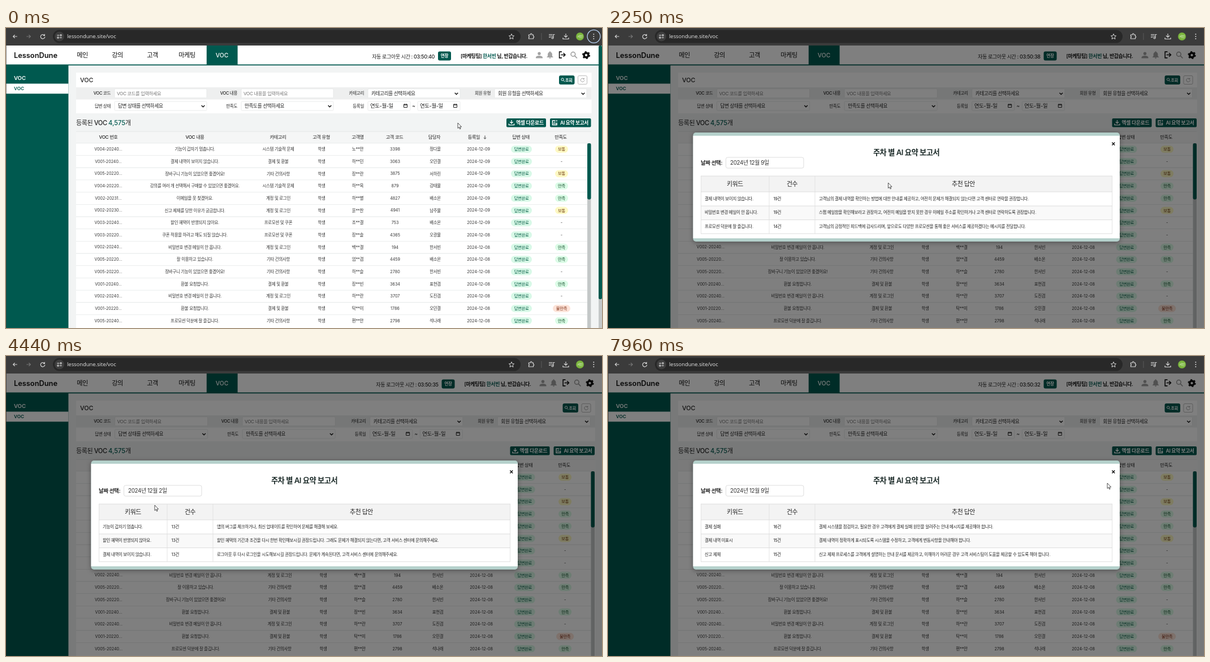
Animation of 1054 by 531 pixels, one loop 8000 ms. Source, as an HTML page with a canvas:

```html
<!DOCTYPE html>
<html lang="ko">
<head>
<meta charset="utf-8">
<title>VOC</title>
<style>
html, body { margin: 0; width: 100%; height: 100%; overflow: hidden; background: #f2f4f4; }
canvas { display: block; width: 1054px; height: 531px; }
</style>
</head>
<body>
<canvas id="stage" width="1054" height="531"></canvas>
<script>
const c = document.getElementById('stage').getContext('2d');
const LOOP = 8000, W = 1054, H = 531;
const GREEN = '#00594f', INK = '#222';
const FONT = 'Inter, "Noto Sans CJK KR", "Noto Sans CJK", sans-serif';

// ---- helpers ----
function box(x, y, w, h, fill, r = 0, stroke) {
  c.beginPath();
  c.roundRect(x, y, w, h, r);
  if (fill) { c.fillStyle = fill; c.fill(); }
  if (stroke) { c.strokeStyle = stroke; c.lineWidth = .8; c.stroke(); }
}

function setFont(s, size, weight, family = FONT) {
  c.font = `${weight} ${size}px ${family}`;
  c.letterSpacing = /[가-힣]/.test(s) ? -.04 * size + 'px' : '0px';
}

function text(s, x, y, size, { color = INK, weight = 400, align = 'left', family } = {}) {
  setFont(s, size, weight, family);
  c.fillStyle = color;
  c.textAlign = align;
  c.textBaseline = 'alphabetic';
  c.fillText(s, x, y + size * .36);
}

function runs(parts, x, y, size, weight) {
  for (const [s, color] of parts) {
    text(s, x, y, size, { color, weight });
    x += c.measureText(s).width;
  }
}

// Paths live on a 24-unit grid centred on (x, y).
function icon(d, x, y, size, color, { line = 0 } = {}) {
  const k = size / 24;
  c.save();
  c.translate(x - size / 2, y - size / 2);
  c.scale(k, k);
  const p = new Path2D(d);
  if (line) {
    c.strokeStyle = color;
    c.lineWidth = line / k;
    c.stroke(p);
  } else {
    c.fillStyle = color;
    c.fill(p);
  }
  c.restore();
}

const ICON = {
  back: 'M21 12H4M11 5L4 12L11 19',
  forward: 'M3 12H20M13 5L20 12L13 19',
  reload: 'M19 7A9 9 0 1 0 21 13M20 2V8H14',
  tune: 'M2 7H11M15 7a3 3 0 1 0 6 0a3 3 0 1 0 -6 0M22 17H13M3 17a3 3 0 1 0 6 0a3 3 0 1 0 -6 0',
  star: 'M12 2L15 9L22 9.5L16.5 14.5L18.5 22L12 18L5.500 22L7.500 14.500L2 9.500L9 9Z',
  puzzle: 'M3 7H9V5a2.500 2.500 0 0 1 5 0V7H19V12a2.500 2.500 0 0 1 0 5V21H3V16a2 2 0 0 0 0 -4Z',
  queue: 'M2 5H15M2 10H15M2 15H9M18 17V5H23M12 17a3 3 0 1 0 6 0a3 3 0 1 0 -6 0',
  download: 'M12 2V15M6 9L12 15L18 9M2 16V21H22V16',
  person: 'M12 12a5 5 0 1 0 0 -10a5 5 0 0 0 0 10ZM1 22V19Q3 14 12 14Q21 14 23 19V22Z',
  bell: 'M12 1Q14 1 14 3Q19 5 19 11V16L22 19V20H2V19L5 16V11Q5 5 10 3Q10 1 12 1ZM9 21H15Q14 24 12 24Q10 24 9 21Z',
  logout: 'M11 2H3V22H11M8 12H22M16 6L22 12L16 18',
  search: 'M2 9a7 7 0 1 0 14 0a7 7 0 1 0 -14 0M14.500 14.500L22 22',
  chevron: 'M3 8L12 17L21 8',
  date: 'M3 5H21V21H3ZM3 8H21M7 2V5M17 2V5',
  down: 'M12 2V21M5 14L12 21L19 14',
  chart: 'M2 3H14V6H5V19H18V12H21V22H2ZM7 11H9V17H7ZM11 8H13V17H11ZM15 13H17V17H15ZM19 1L20 4L23 5L20 6L19 9L18 6L15 5L18 4Z',
  cross: 'M3 3L21 21M21 3L3 21'
};

// ---- content ----
const CATEGORY = ['', '결제 및 환불', '계정 및 로그인', '프로모션 및 쿠폰', '시스템 기술적 문제', '기타 건의사항'];
const CART = '장바구니 기능이 있었으면 좋겠어요!', MAIL = '비밀번호 변경 메일이 안 옵니다.';
const REFUND = '환불 요청합니다.', UNSEEN = '결제 내역이 보이지 않습니다.';
const ROWS = `4-20240|기능이 갑자기 멈춥니다.|노**안|3398|정다올|보통
1-20240|${UNSEEN}|하**민|3063|오민결|-
5-20220|${CART}|장**란|3875|서하린|보통
4-20220|강의를 여러 개 선택해서 구매할 수 있었으면 좋겠어요.|하**옥|879|강태율|만족
2-20231|이메일을 못 찾겠어요.|하**별|4827|배소온|만족
2-20230|신고 제재를 당한 이유가 궁금합니다.|윤**찬|4941|남주율|보통
3-20240|할인 혜택이 반영되지 않아요.|조**결|753|배소온|-
3-20220|쿠폰 적용을 하려고 해도 되질 않습니다.|장**솔|4365|오광율|-
2-20240|${MAIL}|백**결|194|한서빈|만족
5-20220|잘 이용하고 있습니다.|엄**겸|4459|배소온|만족
5-20220|${CART}|하**슬|2780|한서빈|-
1-20240|${REFUND}|장**빈|3634|표현겸|만족
2-20240|${MAIL}|하**란|3707|도진겸|-
1-20220|${REFUND}|탁**미|1786|오민결|불만족
5-20240|프로모션 덕분에 잘 즐깁니다.|편**안|2798|석나래|만족`.split('\n').map(r => r.split('|'));

const REPORTS = [
  [[UNSEEN, 19, '고객님의 결제 내역을 확인하는 방법에 대한 안내를 제공하고, 여전히 문제가 해결되지 않는다면 고객 센터로 연락을 권장합니다.'],
   [MAIL, 19, '스팸 메일함을 확인해보라고 권장하고, 여전히 메일을 받지 못한 경우 이메일 주소를 확인하거나 고객 센터로 연락하도록 권장합니다.'],
   ['프로모션 덕분에 잘 즐깁니다.', 14, '고객님의 긍정적인 피드백에 감사드리며, 앞으로도 다양한 프로모션을 통해 좋은 서비스를 제공하겠다는 메시지를 전달합니다.']],
  [['기능이 갑자기 멈춥니다.', 13, '앱의 버그를 체크하거나, 최신 업데이트를 확인하여 문제를 해결해 보세요.'],
   ['할인 혜택이 반영되지 않아요.', 13, '할인 혜택의 기간과 조건을 다시 한번 확인해보시길 권장드립니다. 그래도 문제가 해결되지 않는다면, 고객 서비스 센터에 문의해주세요.'],
   [UNSEEN, 13, '로그아웃 후 다시 로그인을 시도해보시길 권장드립니다. 문제가 계속된다면, 고객 서비스 센터에 문의해주세요.']],
  [['결제 실패', 16, '결제 시스템을 점검하고, 필요한 경우 고객에게 결제 실패 원인을 알려주는 안내 메시지를 제공해야 합니다.'],
   ['결제 내역 미표시', 15, '결제 내역이 정확하게 표시되도록 시스템을 수정하고, 고객에게 변동사항을 안내해야 합니다.'],
   ['신고 제재', 15, '신고 제재 프로세스를 고객에게 설명하는 안내 문서를 제공하고, 이해하기 어려운 경우 고객 서비스팀이 도움을 제공할 수 있도록 해야 합니다.']]
];

// ---- browser bar ----
function drawBar(focusRing) {
  const pale = '#d6d6d6';
  box(0, 0, W, 31, '#3b3b3b');
  box(83, 3.5, 827, 23, '#282828', 11.5);
  icon(ICON.back, 16, 15, 10, pale, { line: 1.2 });
  icon(ICON.forward, 40, 15, 10, '#777', { line: 1.2 });
  icon(ICON.reload, 65, 15, 10, pale, { line: 1.2 });
  box(86, 6.500, 17, 17, '#3e3e3e', 8.5);
  icon(ICON.tune, 94.5, 15, 10, pale, { line: 1.1 });
  text('lessondune.site/voc', 108, 15, 9.4, { color: '#e6e6e6', family: '"Open Sans", sans-serif' });
  icon(ICON.star, 894, 15, 11, pale, { line: 1 });
  icon(ICON.puzzle, 929, 14.5, 12, pale, { line: 1.2 });
  box(946.5, 9, 1, 12, '#5a5a5a');
  icon(ICON.queue, 965, 15, 12, pale, { line: 1.2 });
  icon(ICON.download, 990, 15, 12, pale, { line: 1.2 });
  box(1008, 8, 14, 14, '#7ab53c', 7);
  text('서빈', 1015, 15, 5.5, { color: '#eef5e8', align: 'center' });
  if (focusRing) {
    box(1028, 3.3, 23, 23, '#3b3b3b', 11.5);
    c.strokeStyle = '#b9d3f5';
    c.lineWidth = 1.3;
    c.stroke();
  }
  for (const y of [11, 15, 19]) box(1038.3, y - 1, 2, 2, pale, 1);
}

// ---- page; wide = page scrollbar hidden ----
function drawPage(wide, clock) {
  const edge = wide ? 6.5 : 0;
  const X = x => x + (x - 124) * edge / 911;

  box(0, 31, W, 500, '#f2f4f4');
  box(0, 31, W, 34, '#fff');
  box(0, 64.5, W, 1.7, GREEN);
  box(0, 66, 110.4, 465, GREEN);
  box(354.8, 31, 54.8, 34, GREEN);
  text('LessonDune', 14, 48, 12.8, { weight: 600, color: '#111' });
  [['메인', 135], ['강의', 197], ['고객', 259], ['마케팅', 320], ['VOC', 382]].forEach(([s, x], i) =>
    text(s, x, 48, i < 4 ? 11.2 : 10.3, { weight: 500, align: 'center', color: i < 4 ? '#111' : '#fff' }));
  text('VOC', 14, 89, 9.6, { weight: 600, color: '#fff' });
  box(0, 98.5, 110.4, 17.7, '#fff');
  text('VOC', 14, 107.3, 8.2, { weight: 600, color: GREEN });
  box(0, 31, .6, 500, '#3b3b3b');

  c.save();
  c.translate(edge, 0);
  text('자동 로그아웃 시간 : ' + clock, 758, 50.5, 9, { weight: 500, align: 'right' });
  box(764, 41.5, 23, 16, GREEN, 3);
  text('연장', 775.5, 49.5, 7.6, { weight: 600, align: 'center', color: '#fff' });
  runs([['[마케팅팀] ', '#111'], ['한서빈', GREEN], [' 님, 반갑습니다.', '#111']], 804, 49.5, 8.9, 600);
  icon(ICON.person, 943, 48, 13, '#a3a3a3');
  icon(ICON.bell, 962, 47.5, 13.5, '#a3a3a3');
  icon(ICON.logout, 983.5, 47.5, 13, '#111', { line: 1.6 });
  icon(ICON.search, 1004.5, 48, 13, '#999', { line: 1.5 });
  drawGear(1026, 48);
  c.restore();

  drawFilters(X, edge);
  drawTable(X, edge);

  if (!wide) {
    box(1048, 31, 6, 500, '#c4c8c8');
    box(1048, 31, 6, 449, GREEN, 2.5);
  }
}

function drawGear(x, y) {
  c.strokeStyle = '#111';
  c.beginPath();
  c.arc(x, y, 3.9, 0, 7);
  c.lineWidth = 3.6;
  c.stroke();
  c.setLineDash([2.8, Math.PI * 12 / 6 - 2.8]);
  c.beginPath();
  c.arc(x, y, 6, 0, Math.PI * 2);
  c.lineWidth = 2.2;
  c.stroke();
  c.setLineDash([]);
}

function drawFilters(X, edge) {
  box(124, 79, 911.5 + edge, 72, '#fff');
  text('VOC', 131, 92, 10.8, { weight: 500 });
  box(978 + edge, 84, 27.5, 16, GREEN, 3);
  icon(ICON.search, 985 + edge, 92, 7.5, '#fff', { line: 1 });
  text('조회', 989 + edge, 92, 7, { weight: 600, color: '#fff' });
  box(1011.5 + edge, 84.5, 16, 15, '#fff', 2, '#aaa');
  icon(ICON.reload, 1019.5 + edge, 92, 8.5, '#999', { line: .9 });
  box(124, 105, 911.5 + edge, 21.5, '#eeefef');

  const labels = ['VOC 코드', 'VOC 내용', '카테고리', '회원 유형', '답변 상태', '만족도', '등록일'];
  const hints = ['VOC 코드를 입력하세요', 'VOC 내용을 입력하세요', '카테고리를 선택하세요',
    '회원 유형을 선택하세요', '답변 상태를 선택하세요', '만족도를 선택하세요'];
  labels.forEach((label, i) => {
    const x = 192 + i % 4 * 224, y = i < 4 ? 115.7 : 138;
    text(label, X(x - 7), y, 7.5, { align: 'right', weight: 500 });
    if (i === 6) return;
    const select = i > 1;
    box(X(x), y - 8, X(x + 163) - X(x), 16, '#fff', 1.5, '#e4e6e6');
    text(hints[i], X(x + (select ? 6 : 4)), y, select ? 8.6 : 8.2,
      { color: select ? INK : '#777', weight: select ? 500 : 400 });
    if (select) icon(ICON.chevron, X(x + 156.5), y + .3, 7.5, '#111', { line: 1.4 });
  });
  for (const x of [640, 728]) {
    box(X(x), 130, 75, 16, '#fff', 1.5, '#e4e6e6');
    text('연도-월-일', X(x + 4), 138, 9.4);
    icon(ICON.date, X(x + 66.5), 137.5, 8, INK, { line: 1 });
  }
  text('~', X(721), 138, 8.5, { align: 'center' });
}

function drawTable(X, edge) {
  runs([['등록된 VOC ', INK], ['4,575', GREEN], ['개', INK]], 124, 168.5, 11.1, 500);
  box(885 + edge, 160, 70, 15.5, GREEN, 2);
  icon(ICON.download, 894 + edge, 167.5, 11, '#fff', { line: 1.4 });
  text('엑셀 다운로드', 902 + edge, 167.7, 8.9, { weight: 600, color: '#fff' });
  box(962 + edge, 160, 72.5, 15.5, GREEN, 2);
  icon(ICON.chart, 970.5 + edge, 167.5, 11.5, '#fff');
  text('AI 요약 보고서', 980 + edge, 167.7, 8.7, { weight: 600, color: '#fff' });

  box(124, 183, 911 + edge, 348, '#fff');
  box(124, 183, 911 + edge, 21, '#f5f6f6');
  box(124, 182.7, 911 + edge, .8, '#dfe2e2');
  const cols = [181, 334, 481, 557.5, 622, 687, 757.5, 827.5, 910.5, 981];
  ['VOC 번호', 'VOC 내용', '카테고리', '고객 유형', '고객명', '고객 코드', '담당자', '등록일', '답변 상태', '만족도']
    .forEach((s, i) => text(s, X(cols[i]), 193.5, 8.2, { align: 'center', weight: 500 }));
  icon(ICON.down, X(847), 193.5, 7.5, '#333', { line: .9 });

  const pill = (s, x, y, w, bg, ink) => {
    box(X(x) - w / 2, y - 6.3, w, 12.6, bg, 6.3);
    text(s, X(x), y, 7.3, { color: ink, align: 'center', weight: 500 });
  };
  const mood = {
    '보통': [23, '#fef9c3', '#713f12'],
    '만족': [23, '#dcfce7', '#14532d'],
    '불만족': [31, '#fde3d8', '#7c2d12']
  };
  ROWS.forEach(([id, body, name, code, staff, rating], i) => {
    const y = 214.5 + i * 21.68;
    const cell = (s, x, size = 7.45) => text(s, X(x), y, size, { align: 'center', color: '#333' });
    box(124, y - 11, 904 + edge, .8, '#e4e7e7');
    cell(`V00${id}...`, 181, 7.1);
    cell(body, 334);
    cell(CATEGORY[id[0]], 481.5);
    cell('학생', 558);
    cell(name, 622, 7.6);
    cell(code, 688, 7.2);
    cell(staff, 759);
    cell(i < 7 ? '2024-12-09' : '2024-12-08', 835.5, 7.2);
    pill('답변완료', 911.5, y, 37, '#d9f9e8', '#065f46');
    if (mood[rating]) pill(rating, 982.5, y, ...mood[rating]);
    else cell('-', 982.5);
  });
  box(1028 + edge, 204, 6.500, 327, '#c4c8c8');
  box(1028 + edge, 204, 6.500, 99.5, GREEN, 3);
}

// ---- dialog ----
function withShadow(blur, alpha, draw) {
  c.save();
  c.shadowColor = `rgba(0,0,0,${alpha})`;
  c.shadowBlur = blur;
  c.shadowOffsetY = 2;
  draw();
  c.restore();
}

function drawDialog({ picking, day, report, ink }) {
  const top = picking ? 127.3 : 185, h = picking ? 308.5 : 193;
  withShadow(9, .35, () => box(150.5, top, 754.5, h, '#b4d0cb', 5));
  box(150.5, top + 5.8, 754.5, h - 11.6, '#fff');
  icon(ICON.cross, 893.8, top + 20, 6.5, '#111', { line: 1.5 });
  text('주차 별 AI 요약 보고서', 527.5, top + 35.3, 13.3, { weight: 600, align: 'center', color: '#1c2b29' });
  text('날짜 선택:', 164, top + 53.5, 9.5, { weight: 600 });
  box(208.5, top + 44, 137.5, 19, '#fff', 3, picking ? GREEN : '#d5d5d5');
  text(`2024년 12월 ${day}일`, 216, top + 53.7, 9.9, { color: '#333' });
  if (picking) drawCalendar();
  else if (ink) drawReport(REPORTS[report], ink);
}

function drawReport(rows, ink) {
  box(164.5, 262, 727, 28, '#f3f3f3');
  box(164.5, 315, 727, 24.5, '#f9f9f9');
  for (const y of [262, 290, 315, 339.5, 364]) box(164, y - .4, 728, .8, '#ddd');
  for (const x of [164.4, 285, 366, 891.6]) box(x - .4, 262, .8, 102, '#ddd');
  c.globalAlpha = ink;
  [['키워드', 224.5], ['건수', 325.5], ['추천 답안', 628.5]].forEach(([s, x]) =>
    text(s, x, 276, 10.9, { weight: 500, align: 'center' }));
  rows.forEach(([key, n, answer], i) => {
    const y = 302 + i * 24.6;
    text(key, 171, y, 7.45);
    text(n + '건', 292.5, y, 7.45);
    text(answer, 373, y, 7.45);
  });
  c.globalAlpha = 1;
}

function drawCalendar() {
  withShadow(6, .2, () => box(208.8, 193.5, 209.5, 212, '#fff', 4));
  box(208.8, 193.5, 209.5, 212, null, 4, '#e2e2e2');
  const mid = { align: 'center' };
  text('<', 226, 210.5, 9, { ...mid, color: '#111' });
  text('>', 401.5, 210.5, 9, { ...mid, color: '#111' });
  text('2024년 12월', 314, 210, 10.3, mid);
  const colX = i => 230.5 + i * 27.65;
  [...'일월화수목금토'].forEach((s, i) => text(s, colX(i), 233, 10.6, { ...mid, weight: 600, color: '#111' }));
  for (let i = 0; i < 42; i++) {
    const next = i > 30, n = next ? i - 30 : i + 1;
    const open = i === 1 || i === 8;
    text(n, colX(i % 7), 257.5 + Math.floor(i / 7) * 25.5, 10.8,
      { ...mid, color: open ? GREEN : next ? '#858585' : '#bcbcbc' });
  }
}

// ---- pointer ----
const PATH = [
  [200, 799, 168], [400, 835, 169], [650, 920, 169], [850, 968, 167], [1030, 984, 165], [1100, 985, 165],
  [1912, 985, 165], [1980, 930, 187], [2050, 790, 222], [2184, 496, 274], [2330, 375, 280], [2530, 292, 262],
  [2730, 277, 238], [2800, 277, 238], [3070, 291, 241], [3366, 291, 241], [3800, 267, 258], [3960, 263, 264],
  [5102, 263, 264], [5510, 275, 240], [5735, 275, 240], [5950, 266, 262], [6160, 258, 277],
  [6941, 258, 277], [7010, 268, 277], [7220, 500, 265], [7420, 770, 250], [7630, 862, 242],
  [7860, 862, 242], [7960, 883, 225]
];
const CLICKS = [[1320, 1450], [2800, 2860], [4020, 4100], [5660, 5720], [6300, 6380]];
const HOVERS = [[950, 1450], [3700, 4100], [5980, 6380]];
const within = (t, spans) => spans.some(([a, b]) => t >= a && t < b);

function pointerAt(t) {
  let a = PATH[0];
  for (const b of PATH) {
    if (t < b[0]) {
      const k = b === a ? 0 : (t - a[0]) / (b[0] - a[0]);
      return [a[1] + (b[1] - a[1]) * k, a[2] + (b[2] - a[2]) * k];
    }
    a = b;
  }
  return [a[1], a[2]];
}

const ARROW = 'M0 0V9.500L2.200 7.500L3.600 10.800L5.100 10.200L3.700 7H6.600Z';
const HAND = 'M-1.200 1Q0 -.8 1.200 1V5L5 6Q6.300 6.500 6 8L5 12.500H-1.500L-4.600 8.500Q-4.500 7 -3 7.500L-1.200 9Z';

function drawPointer(t) {
  const [x, y] = pointerAt(t);
  if (within(t, CLICKS)) box(x - 8.2, y - 6.2, 16.4, 16.4, 'rgba(226,222,20,.75)', 8.2);
  const shape = new Path2D(within(t, HOVERS) ? HAND : ARROW);
  c.save();
  c.translate(x, y);
  c.fillStyle = '#fff';
  c.fill(shape);
  c.strokeStyle = '#222';
  c.lineWidth = .8;
  c.stroke(shape);
  c.restore();
}

// ---- timeline: bursts of [start, end, steps]; the screen rests between them ----
const BURSTS = [
  [270, 1030, 12], [1100, 1320, 2], [1450, 1640, 3], [1980, 2730, 12], [2800, 3070, 5], [3440, 4180, 11],
  [4250, 4440, 2], [5170, 5510, 6], [5660, 6460, 12], [6530, 6670, 3], [7010, 7630, 10], [7910, 7960, 2]
];

function snap(t) {
  let r = 0;
  for (const [a, b, n] of BURSTS) {
    if (t < a) break;
    const d = (b - a) / (n - 1);
    r = a + Math.min(n - 1, Math.floor((t - a) / d + 1e-6)) * d;
  }
  return r;
}

function reportInk(s) {
  if (s < 2860) return s < 1540 ? 0 : s < 1639 ? .6 : 1;
  if (s < 5720) return s < 4179 ? 0 : s < 4249 ? .6 : 1;
  return s < 6459 ? 0 : s < 6529 ? .5 : s < 6669 ? .8 : 1;
}

function draw(t) {
  const s = snap(t), open = s >= 1450;
  const secs = 40 - Math.floor((t + 560) / 1000);
  c.clearRect(0, 0, W, H);
  drawPage(open, '03:50:' + secs);
  if (open) {
    box(0, 31, W, 500, 'rgba(0,0,0,.5)');
    drawDialog({
      picking: within(s, [[2860, 4100], [5720, 6380]]),
      day: within(s, [[4100, 6380]]) ? 2 : 9,
      report: s < 2860 ? 0 : s < 5720 ? 1 : 2,
      ink: reportInk(s)
    });
  }
  drawBar(s < 270);
  drawPointer(s);
}

const start = performance.now();
function tick() {
  draw((performance.now() - start) % LOOP);
  requestAnimationFrame(tick);
}
tick();
</script>
</body>
</html>
```
